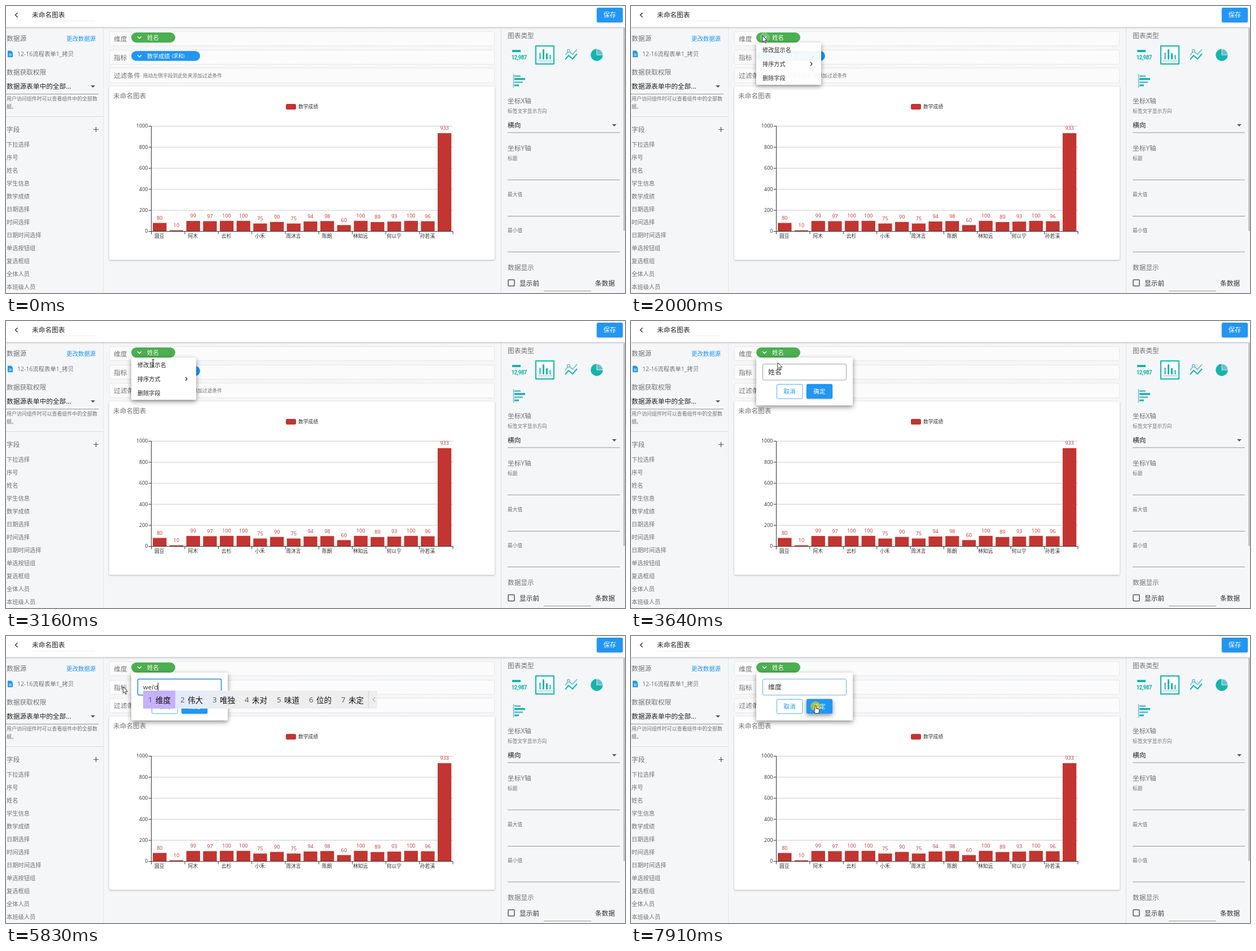
Animation, 1097 px wide and 510 px high, one loop 7990 ms. Source, as an HTML page:

```html
<!DOCTYPE html>
<html lang="zh-CN">
<head>
<meta charset="utf-8">
<title>图表编辑</title>
<style>
html, body { margin: 0; width: 100%; height: 100%; overflow: hidden; background: #f5f6f8; }
svg { display: block; font-family: "Open Sans", "Noto Sans CJK SC", "Noto Sans CJK", sans-serif; }
text { white-space: pre; }
.card { filter: drop-shadow(0 1px 1.5px rgba(0,0,0,.28)); }
.pop { filter: drop-shadow(0 3px 4px rgba(0,0,0,.45)); }
</style>
</head>
<body>
<svg id="stage" width="1097" height="510" viewBox="0 0 1097 510" xmlns="http://www.w3.org/2000/svg"></svg>
<script>
const LOOP = 7990;
const BLUE = '#2196f3', RED = '#c23531', TEAL = '#13b5ac', PALE = '#6fbdd3', GRAY = '#737373', DARK = '#222', BACK = '#f5f6f8';

// Markup helpers; text is placed by its vertical centre.
const text = (x, cy, size, fill, str, extra = '') =>
  `<text x="${x}" y="${(cy + size * 0.37).toFixed(2)}" font-size="${size}" fill="${fill}" ${extra}>${str}</text>`;
const rect = (x, y, w, h, fill, extra = '') =>
  `<rect x="${x}" y="${y}" width="${w}" height="${h}" fill="${fill}" ${extra}/>`;
const path = (d, stroke, width = 1, extra = '') =>
  `<path d="${d}" fill="none" stroke="${stroke}" stroke-width="${width}" ${extra}/>`;
const hline = (x1, x2, y, stroke) => path(`M${x1} ${y}H${x2}`, stroke);
const caretDown = (x, y) => `<path d="M${x - 4} ${y - 2}h8l-4 4z" fill="#555"/>`;
const group = (id, body) => `<g id="${id}">${body}</g>`;

function header() {
  return rect(0, 0, 1097, 37.5, '#fff', 'class="card"') +
    path('M20.5 12L16.5 16L20.5 20', '#333', 1.4) +
    text(46, 16, 11.7, DARK, '未命名图表') +
    path('M46 26.5H157', '#ddd', 1, 'stroke-dasharray="1 1"') +
    rect(1047, 3, 46, 26, BLUE, 'rx="2.5" class="card"') +
    text(1070, 16, 11.2, '#fff', '保存', 'text-anchor="middle" font-weight="500"');
}

function leftPanel() {
  const fields = ['下拉选择', '序号', '姓名', '学生信息', '数学成绩', '日期选择', '时间选择',
    '日期时间选择', '单选按钮组', '复选框组', '全体人员', '本班级人员'];
  return path('M172.5 38V510', '#e6e7e9') +
    text(1, 58, 11.7, GRAY, '数据源') +
    text(107, 58, 10.4, BLUE, '更改数据源') +
    `<path d="M3 79.5h6l3 3v8.5h-9z" fill="${BLUE}"/>` +
    path('M5 85.5h5M5 88h5', '#fff') +
    text(20, 85, 10.4, GRAY, '12-16流程表单1_拷贝') +
    text(1, 118, 11.7, GRAY, '数据获取权限') +
    text(1, 142.5, 11.7, DARK, '数据源表单中的全部...') +
    caretDown(154, 143) +
    hline(0, 164, 156.5, '#949494') +
    text(1, 164.5, 8.95, GRAY, '用户访问组件时可以查看组件中的全部数') +
    text(1, 178.5, 8.95, GRAY, '据。') +
    hline(0, 172, 196.5, '#dcdcde') +
    text(1, 219.5, 11.7, GRAY, '字段') +
    path('M155 219.5h9M159.5 215v9', '#555', 1.2) +
    fields.map((f, i) => text(1, 246 + 23 * i, 10.25, GRAY, f)).join('');
}

function dropRows() {
  const row = (y, h, label) =>
    rect(183.5, y + .5, 682, h, '#fbfbfc', 'rx="2" stroke="#dcdcdc" stroke-dasharray="2 1.5"') +
    text(191, y + h / 2 + .7, 11.8, GRAY, label);
  const pill = (y, w, h, fill) => rect(222, y, w, h, fill, `rx="${h / 2}"`) +
    path(`M233 ${y + 7.3}l3.5 3.2l3.5 -3.2`, '#fff', 1.4);
  return row(45, 25, '维度') + row(78, 25, '指标') + row(110, 26, '过滤条件') +
    pill(47, 78, 18, '#4caf50') + text(250, 56, 10.5, '#fff', '姓名', 'font-weight="500"') +
    pill(80, 122, 17.5, BLUE) + text(250, 89, 10.1, '#fff', '数学成绩', 'font-weight="500"') +
    text(294, 89.3, 8.6, '#fff', '(求和)', 'font-weight="500"') +
    text(243, 124, 8.75, GRAY, '拖动左侧字段到此处来添加过滤条件') +
    '<circle id="ripple" cx="237" cy="56" r="9" fill="#fff"/>';
}

function chart() {
  const values = [80, 10, 99, 97, 100, 100, 75, 90, 75, 94, 98, 60, 100, 89, 93, 100, 96, 933];
  const names = ['圆豆', '阿木', '云杉', '小禾', '周沐言', '陈朗', '林知远', '何以宁', '孙若溪'];
  const x0 = 257.5, x1 = 792, base = 400.5, unit = 0.187, band = (x1 - x0) / values.length;
  let s = rect(183, 143, 683, 308, '#fff', 'rx="2" class="card"') +
    text(190, 160, 11.7, GRAY, '未命名图表') +
    rect(496, 174, 18, 10, RED, 'rx="2.5"') +
    text(518, 178.5, 8.8, '#333', '数学成绩');
  for (let v = 0; v <= 1000; v += 200) {
    const y = +(base - v * unit).toFixed(1);
    if (v) s += hline(x0, x1, y, '#ccc');
    s += hline(x0 - 5, x0, y, '#333') + text(251.5, y - .5, 9, '#333', v, 'text-anchor="end"');
  }
  values.forEach((v, i) => {
    const x = x0 + band * i, mid = x + band / 2, h = v * unit;
    s += rect((x + band * .09).toFixed(1), (base - h).toFixed(1), (band * .82).toFixed(1), h.toFixed(1), RED) +
      text(mid.toFixed(1), base - h - 9, 9, RED, v, 'text-anchor="middle"');
    if (i % 2 === 0) {
      s += path(`M${x.toFixed(1)} ${base}v5`, '#333') +
        text((mid - 0.5).toFixed(1), 409, 8.8, '#333', names[i / 2], 'text-anchor="middle"');
    }
  });
  return s + path(`M${x0} 213V${base}H${x1}v5`, '#333');
}

function chartIcons() {
  const zig = y => `M991 ${y}l6 -7l7 6l8 -9`;
  return rect(897, 78, 15, 4, TEAL) +
    text(909.2, 91, 10, TEAL, '12,987', 'text-anchor="middle" font-weight="700" letter-spacing="-.6" font-family="Roboto, sans-serif"') +
    rect(939, 71, 32, 32, '#fff', `stroke="${TEAL}" stroke-width="2"`) +
    rect(945, 83, 3, 12, PALE) + rect(951, 77, 3, 18, TEAL) +
    rect(957, 84, 3, 11, TEAL) + rect(963, 87, 3, 8, PALE) + hline(943, 968, 97.5, PALE) +
    path(zig(87), PALE, 1.7) + path(zig(95), TEAL, 2) +
    `<circle cx="997" cy="79.5" r="2.3" fill="${BACK}" stroke="${PALE}" stroke-width="1.5"/>` +
    `<circle cx="1047" cy="87" r="10.7" fill="${TEAL}"/>` +
    `<path d="M1047 87V76.3A10.7 10.7 0 0 1 1057.7 87z" fill="${PALE}" stroke="${BACK}" stroke-width=".8"/>` +
    path('M899.5 121V145', PALE, 1.5) +
    rect(901, 123, 11, 3, PALE) + rect(901, 128, 19, 3.5, TEAL) +
    rect(901, 134, 15, 3, PALE) + rect(901, 139.5, 8, 3, TEAL);
}

function rightPanel() {
  const title = (y, s) => text(889, y, 11.7, GRAY, s);
  const small = (y, s) => text(889, y, 8.7, GRAY, s);
  return path('M877.5 38V510', '#e0e1e3') +
    title(53, '图表类型') + chartIcons() +
    title(169, '坐标X轴') + small(187, '标签文字显示方向') +
    text(889, 212, 11.7, DARK, '横向') + caretDown(1078, 212) +
    title(253, '坐标Y轴') + small(271, '标题') + small(335, '最大值') + small(399, '最小值') +
    [225, 309, 373.5, 437].map(y => hline(889, 1088, y, '#949494')).join('') +
    title(465, '数据显示') +
    rect(890, 486.5, 11, 11, 'none', 'rx="1" stroke="#555" stroke-width="1.5"') +
    text(910, 492.5, 11.7, '#333', '显示前') + hline(953, 1037, 506.5, '#949494') +
    text(1044, 492.5, 11.7, '#333', '条数据') +
    rect(1094, 39, 3, 361, '#c4c5c7', 'rx="1.5"');
}

const menu = () => rect(222, 65, 115, 75, '#fff', 'rx="2" class="pop"') +
  ['修改显示名', '排序方式', '删除字段'].map((s, i) => text(233, 78 + 25 * i, 10.2, DARK, s)).join('') +
  path('M318 100l3 3l-3 3', DARK, 1.3);

const dialog = () => rect(222, 65, 171, 85, '#fff', 'rx="2" class="pop"') +
  rect(233.5, 76.5, 148, 28.5, '#fff', 'id="box" rx="2.5"') +
  rect(243, 83, 24, 16, '#3390f0', 'id="mark"') +
  text(243, 91, 11.9, DARK, '', 'id="entry"') +
  rect(0, 83, 1, 16, '#222', 'id="caret"') +
  rect(258.5, 112.5, 45.5, 25.5, '#fff', 'rx="2.5" stroke="#55aef6"') +
  text(281, 125, 10.7, BLUE, '取消', 'text-anchor="middle"') +
  rect(311, 112, 46, 26, BLUE, 'id="confirm" rx="2.5" class="card"') +
  text(334, 125, 10.7, '#fff', '确定', 'text-anchor="middle" font-weight="500"');

const pointer = () =>
  '<circle id="disc" r="9" fill="#e6d200" opacity=".62"/>' +
  '<path id="arrow" d="M0 0V11.2L2.6 8.8L4.5 13L6.3 12.2L4.4 8.1H8z" fill="#fff" stroke="#222" stroke-width=".9"/>' +
  '<path id="hand" d="M-1.2 6V-.8Q0 -2.2 1.2 -.8V4L5.6 5Q7 5.5 6.7 7.4L5.6 12.5H-.2L-3.2 7.6Q-3.2 5.8 -1.2 7.4z" fill="#fff" stroke="#222" stroke-width=".9"/>' +
  '<path id="beam" d="M-2 -6H2M0 -6V6M-2 6H2" fill="none" stroke="#222"/>';

const $ = id => document.getElementById(id);
$('stage').innerHTML =
  `<defs><linearGradient id="glass" gradientUnits="userSpaceOnUse" x1="290" x2="420">
    <stop offset="0" stop-color="#dfeafb"/><stop offset="1" stop-color="#eeeeef"/></linearGradient></defs>` +
  rect(0, 0, 1097, 510, BACK) + leftPanel() + dropRows() + chart() + rightPanel() + header() +
  group('menu', menu()) + group('dialog', dialog()) + group('words', '') + group('pointer', pointer());

// Bursts of evenly spaced screen updates: start, end, count.
const BURSTS = [[210, 990, 11], [1540, 2300, 11], [2390, 2690, 5], [3010, 3770, 10],
  [3870, 4100, 4], [4250, 4630, 6], [7210, 7910, 10]];

// Pointer stops: time, x, y.
const STOPS = [[210, 964, 472], [366, 810, 375], [522, 520, 210], [678, 300, 95], [834, 198, 52], [990, 226, 54],
  [1540, 228, 53], [1768, 228, 53], [1996, 233, 53], [2390, 233, 53], [2690, 261, 75], [3640, 260, 74],
  [3870, 261, 78], [4100, 270, 91], [4250, 269, 91], [4630, 207.5, 90.5],
  [7210, 207.5, 90.5], [7520, 262, 122], [7700, 316, 129], [7830, 327, 125]];

const TYPED = [
  [5500, 'w', '我 我们 为 问题 为了 完成 位置'],
  [5660, 'we', '为了 文件 问题 未来 位置 温度 稳定'],
  [5830, "wei'd", '维度 伟大 唯独 未对 味道 位的 未定'],
  [5890, "wei'du", '维度 纬度 未读 围堵 维度表 维度空间 维度分析'],
  [6140, '维度', '']
];

const during = (t, a, b) => t >= a && t < b;
const ramp = (t, a, b) => Math.min(1, Math.max(0, (t - a) / (b - a)));
const show = (id, on) => $(id).setAttribute('visibility', on ? 'inherit' : 'hidden');
const set = (id, attrs) => { for (const k in attrs) $(id).setAttribute(k, attrs[k]); };

function hold(t) {
  const b = BURSTS.find(([from, to]) => during(t, from, to));
  if (!b) return t;
  const step = (b[1] - b[0]) / (b[2] - 1);
  return b[0] + Math.floor((t - b[0]) / step + 1e-6) * step;
}

function pointerAt(t) {
  const i = STOPS.findIndex(s => s[0] > t);
  if (i < 0) return STOPS[STOPS.length - 1].slice(1);
  const a = STOPS[Math.max(0, i - 1)], b = STOPS[i], k = ramp(t, a[0], b[0]);
  return [a[1] + (b[1] - a[1]) * k, a[2] + (b[2] - a[2]) * k];
}

function pointerKind(t, x, y) {
  if (during(t, 1060, 1690)) return 'hand';
  if (during(t, 2690, 3250)) return 'beam';
  if (t >= 3870 && x > 233 && y > 76 && y < 106) return 'beam';
  if (t >= 7210 && y > 112 && (during(x, 258, 304) || x > 311)) return 'hand';
  return 'arrow';
}

let shownWords = '';
function drawWords(list) {
  if (list === shownWords) return;
  shownWords = list;
  let s = '', x = 243;
  if (list) list.split(' ').forEach((w, i) => {
    const width = 30 + 13.5 * w.length;
    if (!i) s += rect(x, 97, width, 32, '#c6b2fb');
    s += text(x + 9, 113.5, 13.3, '#555', i + 1) + text(x + 22, 113.5, 13.5, '#111', w);
    x += width;
  });
  $('words').innerHTML = list ? rect(243, 97, x + 16 - 243, 32, 'url(#glass)') + s +
    path(`M${Math.round(x) + .5} 97V129`, '#d4d4d6') + path(`M${x + 12} 109l-4 4l4 4`, '#888') : '';
}

function drawEntry(t) {
  const typed = TYPED.filter(s => s[0] <= t).pop();
  const str = typed ? typed[1] : '姓名';
  const picked = t >= 4400 && !typed;
  $('entry').textContent = str;
  set('entry', { 'font-size': str[0] === 'w' ? 11.2 : 11.9, fill: picked ? '#fff' : '#333' });
  set('mark', { width: t < 4480 ? 13 : 24, x: t < 4480 ? 254 : 243 });
  show('mark', picked);
  const focused = t >= 4250, left = t >= 7905;
  set('box', {
    stroke: focused ? (left ? '#6aaee6' : '#1e88e5') : t >= 3870 ? '#444' : '#a0a0a0',
    'stroke-width': focused && !left ? 1.5 : 1
  });
  set('caret', { x: str === '维度' ? 266 : Math.round(243 + $('entry').getComputedTextLength()) });
  show('caret', during(t, 5500, 6660) || during(t, 7210, 7740));
  drawWords(typed ? typed[2] : '');
}

function draw(now) {
  const t = hold(now % LOOP);
  const fadeIn = ramp(t, 3170, 3480);
  set('menu', { opacity: t < 3170 ? ramp(t, 1660, 2020) : 1 - ramp(t, 3170, 3300) });
  set('dialog', { opacity: fadeIn });
  show('dialog', fadeIn > 0);
  drawEntry(t);
  set('confirm', { class: t >= 7830 ? 'pop' : 'card' });

  set('ripple', { r: 9 * ramp(t, 1540, 1850), opacity: during(t, 1540, 2300) ? .24 * (1 - ramp(t, 2000, 2300)) : 0 });

  const [x, y] = pointerAt(t), kind = pointerKind(t, x, y);
  set('pointer', { transform: `translate(${x.toFixed(1)} ${y.toFixed(1)})` });
  show('pointer', t >= 210);
  ['arrow', 'hand', 'beam'].forEach(k => show(k, k === kind));
  show('disc', during(t, 1540, 1690) || during(t, 3010, 3090) || during(t, 4250, 4500) || t >= 7830);
}

function tick(now) {
  draw(now);
  requestAnimationFrame(tick);
}
draw(0);
requestAnimationFrame(tick);
</script>
</body>
</html>
```
